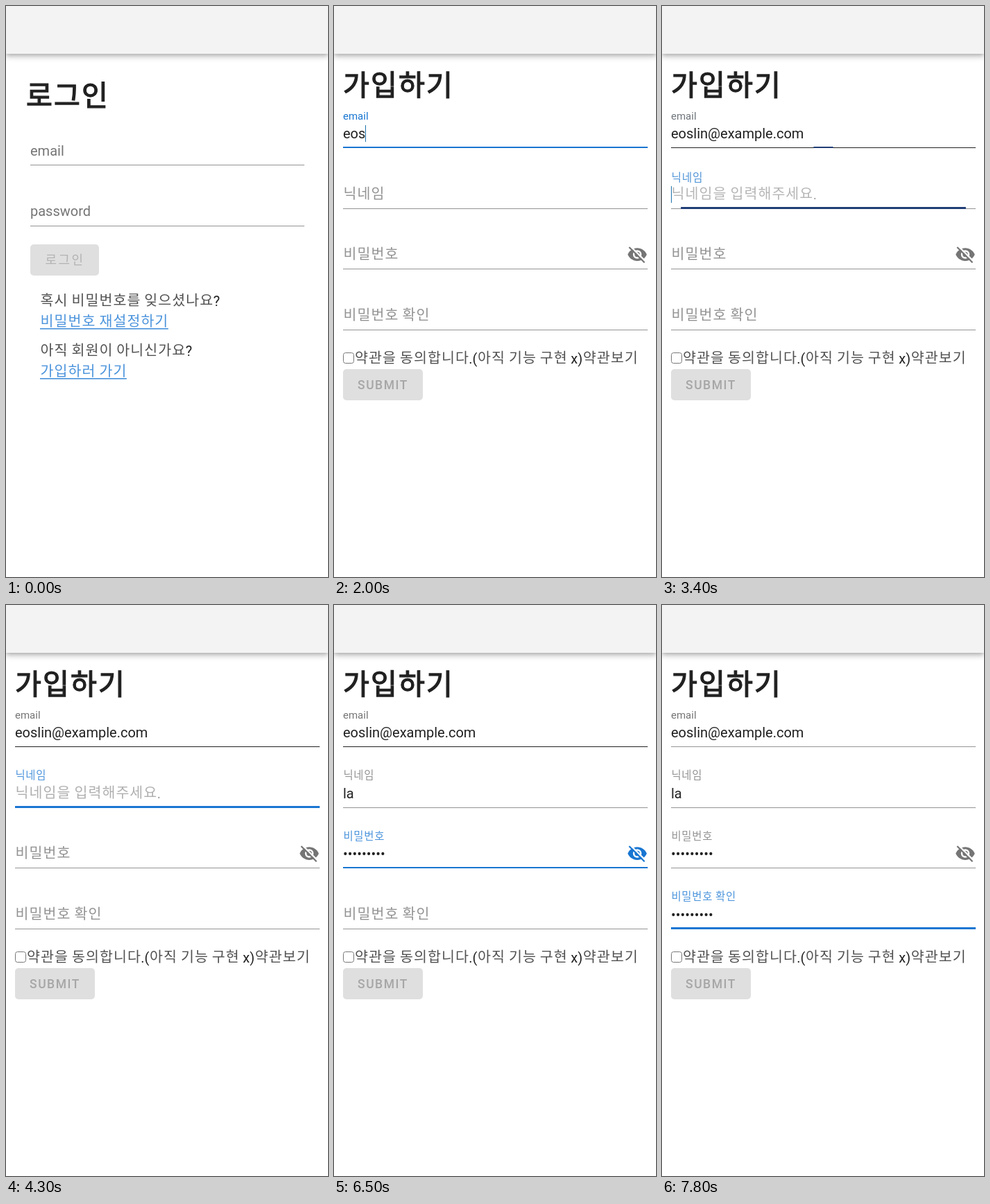
Write an HTML page with a canvas that moves like this. It is 464 px wide and 824 px high and loops after 8000 ms.

```html
<!DOCTYPE html>
<html lang="ko">
<head>
<meta charset="utf-8">
<style>
  html, body { margin: 0; width: 100%; height: 100%; overflow: hidden; background: #fff; }
  canvas { position: absolute; left: 0; top: 0; }
  header {
    position: absolute; left: 0; top: 0; width: 464px; height: 69px; background: #f3f3f3;
    box-shadow: 0 2.5px 5px -1.25px rgba(0,0,0,.2), 0 5px 6.25px rgba(0,0,0,.14), 0 1.25px 12.5px rgba(0,0,0,.12);
  }
</style>
</head>
<body>
<canvas width="464" height="824"></canvas>
<header></header>
<script>
const LOOP = 8000, STEP = 100, SIGNUP = 1200, FADE = 200;
const INK = [33, 33, 33], GREY = [117, 117, 117], LINE = [148, 148, 148];
const BLUE = [25, 118, 210], NAVY = [32, 62, 118];
const LEFT = 13, WIDTH = 439, PITCH = 87.5;
const ctx = document.querySelector('canvas').getContext('2d');

// keys: the moment at which each character appears
const fields = [
  { label: 'email', hint: '이메일을 입력해주세요.', value: 'eoslin@example.com', from: 1660, to: 3266,
    keys: [1800, 1900, 2000, 2200, 2200, 2200, 2300, 2300, 2500, 2500, 2600, 2700, 2800, 2900, 3000, 3100, 3200, 3200] },
  { label: '닉네임', hint: '닉네임을 입력해주세요.', value: 'la', from: 3266, to: 4800, keys: [4600, 4800] },
  { label: '비밀번호', hint: '비밀번호를 입력해주세요.', value: '•'.repeat(9), from: 4800, to: 6750, eye: true,
    keys: [5600, 5600, 5700, 5900, 5900, 6000, 6100, 6200, 6200] },
  { label: '비밀번호 확인', hint: '비밀번호를 다시 입력해주세요.', value: '•'.repeat(9), from: 6750, to: 9000,
    keys: [7100, 7100, 7200, 7400, 7400, 7500, 7600, 7700, 7700] }
];
const caretOff = [[3900, 4100], [4300, 4600], [5300, 5600], [6500, 6700], [7800, 8000]];

const clamp = v => Math.min(1, Math.max(0, v));
const rgb = (c, a = 1) => `rgba(${c},${a})`;
const mix = (a, b, k) => rgb(a.map((v, i) => v + (b[i] - v) * k));

// cubic-bezier(0, 0, .2, 1)
function ease(x) {
  x = clamp(x);
  if (x === 0 || x === 1) return x;
  let lo = 0, hi = 1;
  for (let i = 0; i < 24; i++) {
    const s = (lo + hi) / 2;
    if (.6 * (1 - s) * s * s + s ** 3 < x) lo = s; else hi = s;
  }
  return 3 * lo * lo - 2 * lo ** 3;
}

// Hangul is drawn light with slight tracking; returns the end of the text
function text(str, x, y, size, color, weight = 400, gap = 0) {
  ctx.fillStyle = color;
  for (const run of str.match(/[가-힣]+|[^가-힣]+/g) || []) {
    const hangul = /[가-힣]/.test(run), track = hangul ? size * .052 : 0;
    ctx.font = hangul
      ? `300 ${size * 1.03}px "Noto Sans CJK KR", "Noto Sans CJK", sans-serif`
      : `${weight} ${size}px Roboto, sans-serif`;
    ctx.letterSpacing = gap + track + 'px';
    ctx.globalAlpha = hangul ? .78 : 1;
    ctx.fillText(run, x + track / 2, y - track / 2);
    ctx.globalAlpha = 1;
    x += ctx.measureText(run).width;
  }
  return x;
}

// A medium weight: the regular face with a thin outline
function heading(str, x, y) {
  ctx.font = '400 41.2px "Noto Sans CJK KR", "Noto Sans CJK", sans-serif';
  ctx.letterSpacing = '2.1px';
  ctx.fillStyle = ctx.strokeStyle = rgb(INK);
  ctx.lineWidth = 1.3;
  ctx.lineJoin = 'miter';
  ctx.fillText(str, x, y);
  ctx.strokeText(str, x, y);
}

function rect(x, y, w, h, color) {
  ctx.fillStyle = color;
  ctx.fillRect(x, y, w, h);
}

function disc(x, y, r, fill) {
  ctx.fillStyle = fill;
  ctx.beginPath();
  ctx.arc(x, y, r, 0, 7);
  ctx.fill();
}

function button(label, x, y, w, shadow = 0) {
  ctx.save();
  ctx.shadowColor = rgb([0, 0, 0], .4 * shadow);
  ctx.shadowBlur = 4;
  ctx.shadowOffsetY = 1.5;
  ctx.fillStyle = '#dfdfdf';
  ctx.beginPath();
  ctx.roundRect(x, y, w, 45, 5);
  ctx.fill();
  ctx.restore();
  text(label, x + 21, y + 29, 17.5, '#a6a6a6', 500, 1.5625);
}

const lens = new Path2D('M1 12C2.73 7.61 7 4.5 12 4.5s9.27 3.11 11 7.5c-1.73 4.39-6 7.5-11 7.5S2.73 16.39 1 12ZM12 17a5 5 0 1 0 0-10a5 5 0 1 0 0 10Z');

function eyeOff(color) {
  ctx.save();
  ctx.translate(422, 343.5);
  ctx.scale(1.25, 1.25);
  ctx.fillStyle = color;
  ctx.fill(lens, 'evenodd');
  disc(12, 12, 3, color);
  ctx.lineWidth = 1.8;
  for (const [shift, stroke] of [[1.27, '#fff'], [0, color]]) {
    ctx.strokeStyle = stroke;
    ctx.beginPath();
    ctx.moveTo(2.635 + shift, 3.635 - shift);
    ctx.lineTo(20.365 + shift, 21.365 - shift);
    ctx.stroke();
  }
  ctx.restore();
}

function link(label, y) {
  const end = text(label, 49, y, 20, rgb(BLUE));
  rect(49, y + 2, end - 49, 1.5, rgb(BLUE, .85));
}

function login() {
  heading('로그인', 29, 143.5);
  text('email', 35, 216, 20, rgb(GREY));
  rect(35, 229, 395, 1, rgb(LINE));
  text('password', 35, 303, 20, rgb(GREY));
  rect(35, 317, 395, 1, rgb(LINE));
  button('로그인', 35, 344, 99);
  text('혹시 비밀번호를 잊으셨나요?', 49, 433, 20, rgb(INK));
  link('비밀번호 재설정하기', 463);
  text('아직 회원이 아니신가요?', 49, 505, 20, rgb(INK));
  link('가입하러 가기', 535);
}

function field(f, i, t) {
  const base = 191 + PITCH * i, lineY = Math.round(204 + PITCH * i);
  const opened = ease((t - f.from) / FADE);
  const focus = opened - ease((t - f.to) / FADE);
  const typed = f.value.slice(0, f.keys.filter(k => t >= k).length);

  text(f.label, LEFT, base - 26.7 * opened, 20 - 5 * opened, mix(GREY, BLUE, focus));
  if (!typed) text(f.hint, LEFT, base, 20, rgb([0, 0, 0], .4 * focus));
  const end = text(typed, LEFT, base, 20, rgb(INK));

  const hover = i ? 0 : ease((t - 1600) / FADE) - ease((t - 6660) / FADE);
  rect(LEFT, lineY, WIDTH, 1, mix(LINE, INK, hover));
  // the focus line is darker while it grows or shrinks
  const w = WIDTH * focus, odd = i % 2;
  rect(LEFT + (WIDTH - w) / 2, lineY - 1 - odd, w, 2 + odd, rgb(focus < 1 ? NAVY : BLUE));

  const active = t >= f.from && t < f.to;
  if (f.eye) eyeOff(mix(GREY, BLUE, active ? 1 : 0));
  if (active && !caretOff.some(([a, b]) => t >= a && t < b))
    rect(Math.round(end), Math.round(base - 19), 1, 24, '#1c72ac');
}

function signup(t) {
  heading('가입하기', 13, 128.5);
  fields.forEach((f, i) => field(f, i, t));
  ctx.strokeStyle = '#767676';
  ctx.lineWidth = 1;
  ctx.beginPath();
  ctx.roundRect(13.5, 500.5, 15, 15, 3);
  ctx.stroke();
  text('약관을 동의합니다.(아직 기능 구현 x)약관보기', 29.5, 515.5, 20, rgb(INK));
  button('SUBMIT', LEFT, 524, 115, 1 - clamp((t - SIGNUP) / FADE));
  if (t < SIGNUP + STEP) {
    const shade = ctx.createLinearGradient(120, 0, 142, 0);
    shade.addColorStop(.35, '#656565');
    shade.addColorStop(.65, '#888');
    disc(131, 536, 14, 'rgba(110,110,110,.6)');
    disc(131, 536, 11.5, shade);
  }
}

function draw(now) {
  const t = Math.floor(now % LOOP / STEP) * STEP;
  rect(0, 0, 464, 824, '#fff');
  if (t < SIGNUP) login(); else signup(t);
  requestAnimationFrame(draw);
}
requestAnimationFrame(draw);
</script>
</body>
</html>
```
